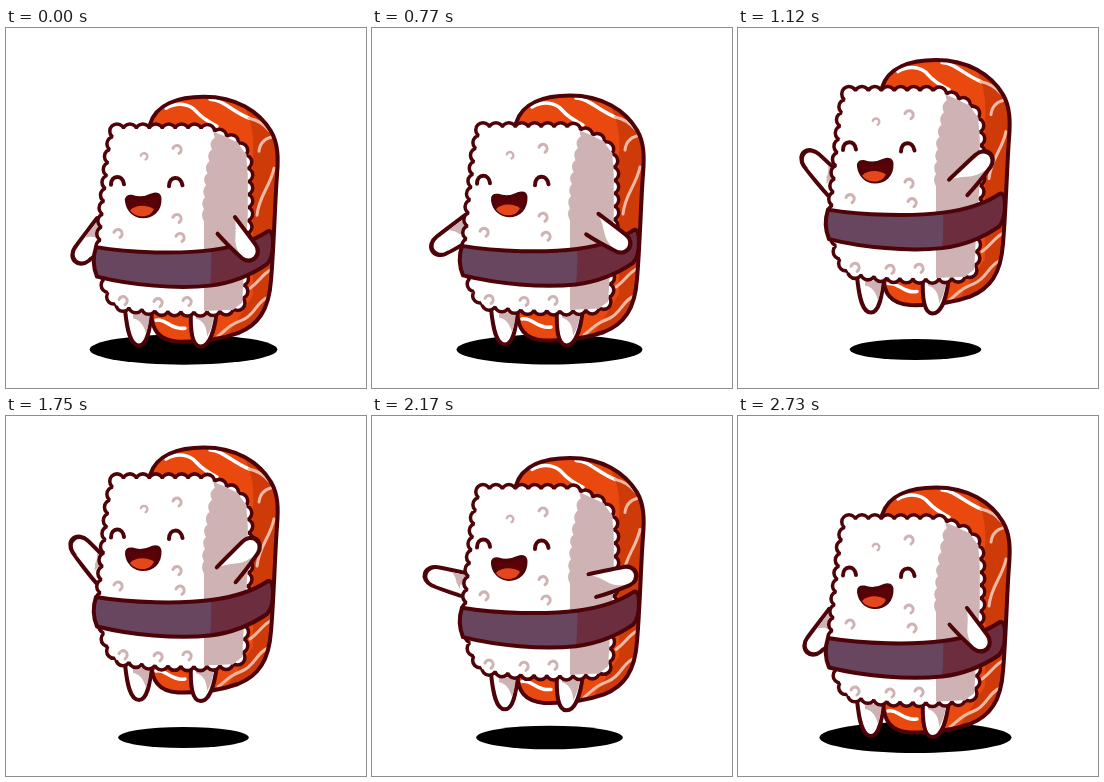
These frames come from a looping animation (360x360 px, 3220 ms). An HTML page without scripts:

```html
<!DOCTYPE html>
<html lang="en">
<head>
<meta charset="utf-8">
<title>Jumping sushi</title>
<style>
  /* --up: jump height 0..1, --arm: arm swing 0..1 */
  @property --up { syntax: '<number>'; inherits: true; initial-value: 0; }
  @property --arm { syntax: '<number>'; inherits: true; initial-value: 0; }

  html, body { margin: 0; width: 100%; height: 100%; overflow: hidden; background: #fff; }
  svg { display: block; width: 100%; height: 100%; animation: jump 3220ms step-end infinite; }

  @keyframes jump {
    0% { --up: .07; --arm: 0; }
    2.1% { --up: .055; --arm: 0; }
    4.3% { --up: .04; --arm: 0; }
    8.6% { --up: .03; --arm: 0; }
    15.2% { --up: .02; --arm: 0; }
    17.3% { --up: .02; --arm: .03; }
    19.5% { --up: .03; --arm: .06; }
    21.7% { --up: .05; --arm: .1; }
    23.9% { --up: .1; --arm: .16; }
    26% { --up: .22; --arm: .3; }
    28.2% { --up: .7; --arm: .62; }
    30.4% { --up: .9; --arm: .84; }
    32.6% { --up: .96; --arm: .94; }
    34.7% { --up: .985; --arm: .98; }
    36.9% { --up: .995; --arm: .99; }
    39.1% { --up: 1; --arm: 1; }
    56.5% { --up: .995; --arm: .99; }
    58.6% { --up: .985; --arm: .98; }
    60.8% { --up: .965; --arm: .95; }
    63% { --up: .93; --arm: .9; }
    65.2% { --up: .86; --arm: .8; }
    67.3% { --up: .74; --arm: .66; }
    69.5% { --up: .3; --arm: .28; }
    71.7% { --up: .13; --arm: .14; }
    73.9% { --up: .07; --arm: .07; }
    76% { --up: .035; --arm: .035; }
    78.2% { --up: .015; --arm: .015; }
    80.4%, 100% { --up: 0; --arm: 0; }
  }

  .body { transform: translateY(calc(var(--up) * -41px)); }
  .salmon { transform: translateY(calc(var(--up) * -40px)); }
  .feet { transform: translateY(calc(var(--up) * -36px)); }
  .face { transform: translateY(calc(var(--up) * 3px)); }
  .rice { transform-origin: 0 95px; transform: scaleY(calc(1 + var(--up) * .026)); }
  .arm {
    transform: rotate(calc(49deg - var(--arm) * 98deg))
      scaleX(calc(var(--reach) + var(--arm) * .07));
  }
  .shadow { transform: translate(177.5px, 321.5px) scale(calc(1 - var(--up) * .32)); }

  .line { stroke: #4d0308; stroke-width: 4; stroke-linecap: round; stroke-linejoin: round; }
  .none { fill: none; }
  .white { fill: #fff; }
  .pink { fill: #cfb2b3; }
  .streak { fill: none; stroke: #fff; stroke-width: 3.5; stroke-linecap: round; }
  .dim { stroke: #f0b9a5; stroke-width: 3; }
  .grains { fill: none; stroke: #cfb2b3; stroke-width: 3; stroke-linecap: round; }
  .bumps { stroke-linecap: round; stroke-linejoin: round; stroke-dasharray: 0 1; }
  .rim { stroke: #4d0308; fill: #4d0308; stroke-width: 18; }
  .front { stroke: #fff; fill: #fff; stroke-width: 11; }
  .solid { stroke-dasharray: none; stroke-width: 4.5; }
  .side { stroke: #cfb2b3; fill: #cfb2b3; }
</style>
</head>
<body>
<svg viewBox="0 0 360 360">
  <defs>
    <path id="block" pathLength="45" d="M111 106H200L215 112L230 119L238 130L239.500 150V190L236 240L234 276L226 282L190 283.500L150 282.500L112 278L104 265L101 255L97 220L100 185L104 150L106 128Z"/>
    <path id="grain" d="M-4 -1A4.2 4.2 0 1 1 2 4"/>
    <g id="limb">
      <path class="pink" d="M10 0L22 -6L31 9.700L8 11.500Z"/>
      <path class="white" d="M0 -12C12 -11 22 -10.500 31 -9.500A9.700 9.700 0 0 1 32 9.700C26 8 20 7 15 2Q8 -6 0 -12Z"/>
      <path class="line none" d="M0 -12C12 -11 22 -10.500 31 -9.500A9.700 9.700 0 0 1 32 9.700C22 11 12 12 1 12"/>
    </g>
    <path id="slab" d="M144 99C150 79 172 71.500 198 71.500C230 71.500 253 86 265 106C272 118 272.500 132 271 150C269 175 268 220 265 255C263 285 252 300 232 308C212 315 190 317 172 316.500C152 315 146 304 145 288Z"/>
    <path id="belt" d="M90 222C125 228 175 229 205 225C230 222 250 214 262 206Q267 205 267 217Q267 233 261 239C245 250 225 258 204 260.500C170 264 125 260 91 251.500Q85 237 90 222Z"/>
    <clipPath id="slabClip"><use href="#slab"/></clipPath>
    <clipPath id="beltClip"><use href="#belt"/></clipPath>
    <clipPath id="sideClip">
      <path d="M212 100q-7 5 -3 12q-7 5 -3 12q-6 5 -2.500 12q-6 5 -2 12q-6 5 -1.500 12q-5 5 -1 12q-5 5 -1 12q-4 5 0 12V300H262V100Z"/>
    </clipPath>
  </defs>

  <ellipse class="shadow" rx="96" ry="15.500"/>

  <g class="salmon">
    <use href="#slab" fill="#e9480f"/>
    <g clip-path="url(#slabClip)">
      <path fill="#cf3b08" d="M230 68C243 85 249 105 247 130V270L214 322H280V68Z"/>
      <g class="streak">
        <path d="M160 83C172 76 184 79 190 86S203 97 211 101"/>
        <path d="M204 74C218 75 224 85 243 93"/>
        <path class="dim" d="M243 93C252 95 258 99 263 105"/>
        <path class="dim" d="M270 111C260 112 254 117 253 126"/>
        <path class="dim" d="M268 143C264 162 253 170 251 190"/>
        <path class="dim" d="M266 244C256 249 254 256 244 263"/>
        <path class="dim" d="M262 272C250 277 249 290 236 295S222 303 212 311"/>
        <path d="M150 295C160 293 165 305 179 303"/>
      </g>
    </g>
    <use href="#slab" class="line none"/>
  </g>

  <g class="feet">
    <path class="line white" d="M119 284C121 304 124 320 133 320C141 320 144 305 146 284"/>
    <path class="pink" d="M127 288H144C143 297 142 303 140 308C138 300 134 294 127 293Z"/>
    <path class="line white" d="M211 284C209 303 204 321 194.500 321C186 321 184 305 185 284"/>
    <path class="pink" d="M190 288H208C207 298 205 305 201 311C201 301 197 295 190 293Z"/>
  </g>

  <g class="body">
    <g transform="translate(100 201) scale(-1 1)">
      <g class="arm" style="--reach: 1.17">
        <path class="white" d="M0 -12L31 -9V9L0 12Z"/>
        <use href="#limb"/>
        <path class="white" d="M6 9.500L14 -1L29 8.500Z"/>
        <path class="pink" d="M0 -10L19 -8.500Q14 -4 13 1L0 1Z"/>
      </g>
    </g>

    <g class="rice">
      <use href="#block" class="bumps rim"/>
      <use href="#block" class="bumps front"/>
      <use href="#block" class="front solid"/>
      <g clip-path="url(#sideClip)"><use href="#block" class="side solid"/></g>
      <g class="grains">
        <use href="#grain" x="112" y="208"/>
        <use href="#grain" x="171" y="193"/>
        <use href="#grain" x="174" y="212"/>
        <use href="#grain" x="117" y="275"/>
        <use href="#grain" x="152" y="277"/>
        <use href="#grain" x="181" y="276"/>
      </g>
    </g>

    <g class="face">
      <g class="grains">
        <use href="#grain" transform="translate(138 131) scale(.8)"/>
        <use href="#grain" x="171" y="124"/>
      </g>
      <path class="line none" d="M105 159.500C105 149 117 149 118 159M163 161C163 150 175 150 176.500 160"/>
      <path class="line" fill="#5a0206" d="M121 176Q120 171 126 171.500C133 174 140 173 146 170Q153 167.500 153.500 173C154 185 146 191 137 191C128 191 122 184 121 176Z"/>
      <path fill="#e5471c" d="M124 185C129 179 142 179 148 184C145 189 142 191 137 191C131 191 127 189 124 185Z"/>
    </g>

    <use href="#belt" fill="#694660"/>
    <path clip-path="url(#beltClip)" fill="#6c2d3e" d="M204 195H275V265H203Q207 245 204 195Z"/>
    <use href="#belt" class="line none"/>

    <g transform="translate(220 200)">
      <g class="arm" style="--reach: 1.1"><use href="#limb"/></g>
    </g>
  </g>
</svg>
</body>
</html>
```
